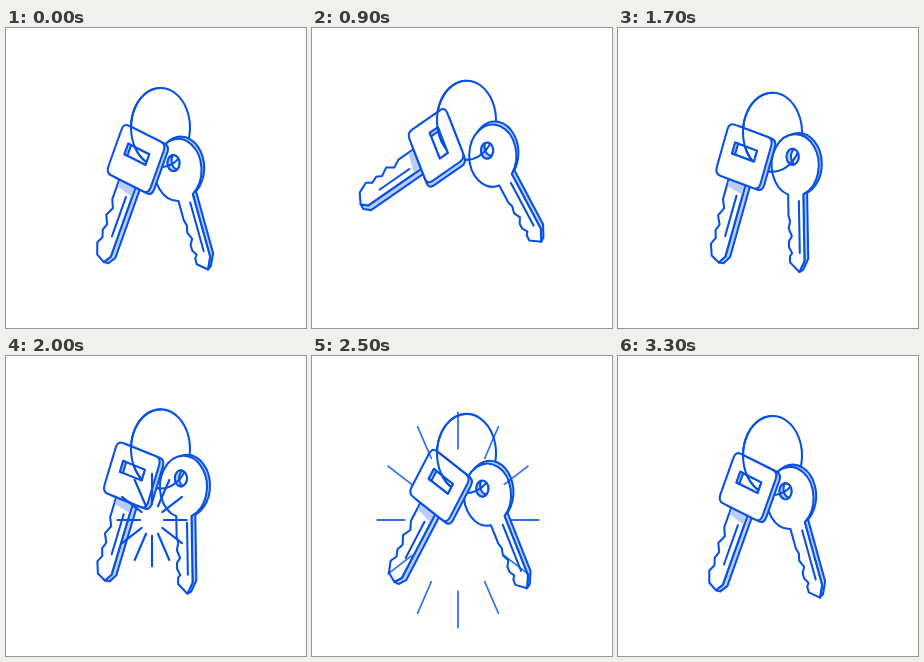
An HTML page for the animation above (3.4 s loop, 300x300 px).

```html
<!DOCTYPE html>
<html lang="en">
<head>
<meta charset="utf-8">
<title>Jingling keys</title>
<style>
  html, body { margin: 0; width: 100%; height: 100%; overflow: hidden; background: #fff; }
  svg { display: block; width: 100vw; height: 100vh; }
  path { vector-effect: non-scaling-stroke; }
  .ink { fill: none; stroke: #0650e6; stroke-width: 2.05; stroke-linecap: round; stroke-linejoin: round; }
  .front { fill: #fff; fill-rule: evenodd; }
  .side { fill: #b9ccfa; fill-rule: evenodd; }
  .shade { fill: #b9ccfa; stroke: none; }
</style>
</head>
<body>
<svg viewBox="0 0 300 300" class="ink">
  <path id="ring"/>

  <g id="roundKey">
    <path class="side" d="M-26 -1 a30.5 31 0 1 1 61 0 a30.5 31 0 1 1 -61 0 Z
      M-11 -8.5 a8 8 0 1 0 16 0 a8 8 0 1 0 -16 0 Z"/>
    <path class="side" d="M10 29 V96 L3 107 L8 105 L15 94 V27 Z"/>
    <path class="front" d="M-10 29.3 A31 31 0 1 1 10 29.3 V96 L3 107 L-9 97 V91 L-6 88 L-10 82 V76 L-6 71 L-10 63 L-8 56 L-10 50 Z
      M-11 -8.5 a8 8 0 1 0 16 0 a8 8 0 1 0 -16 0 Z"/>
    <path class="side" d="M-1 -16.2 A8 8 0 1 0 -1 -0.8 A9 9 0 0 1 -1 -16.2 Z"/>
    <path d="M4 36 V88"/>
  </g>

  <path id="lowerArc"/>

  <g id="squareKey">
    <path class="side" d="M9 20 V101 L3 109 L9 108 L15 100 V20 Z"/>
    <path class="front" d="M-13.5 20 V48 L-9 56 L-14 65 L-9 73 L-12 80 L-9 87 L-13 94 L-8 105 L3 109 L9 101 V20 Z"/>
    <path class="shade" d="M-12.5 25 H8 V37 L-12.5 34 Z"/>
    <path d="M1.8 40 V82"/>
    <path class="side" d="M-20 -26 H25 q7 0 7 7 V20 q0 7 -7 7 H-20 Z M-18 -9.5 V2 H11.5 V-9.5 Z"/>
    <path class="front" d="M-25 -26 H20 q7 0 7 7 V20 q0 7 -7 7 H-25 q-7 0 -7 -7 V-19 q0 -7 7 -7 Z
      M-18 -9.5 V2 H11.5 V-9.5 Z"/>
    <path class="side" d="M-18 -9.5 h4 V2 h-4 Z"/>
  </g>

  <path id="upperArc"/>
  <path id="burst"/>
</svg>
<script>
const LOOP = 3400, STEP = 100;
const RING = { x: 154.5, rx: 29.5, ry: 39.5 };
const BURST = { x: 146, y: 164, squash: 0.75, radius: 116, start: 1800, duration: 1050 };

const el = id => document.getElementById(id);
const rad = deg => deg * Math.PI / 180;

// Sine easing from one turning point [time, value] to the next
function sway(t, ...turns) {
  const i = turns.findIndex(([time]) => time > t);
  if (i === 0) return turns[0][1];
  if (i < 0) return turns[turns.length - 1][1];
  const [[t0, v0], [t1, v1]] = [turns[i - 1], turns[i]];
  return v0 + (v1 - v0) * (1 - Math.cos(Math.PI * (t - t0) / (t1 - t0))) / 2;
}

// Keys swing in planes turned away from the viewer; returns where the hole lands
function placeKey(id, x, y, angle, squash, skew, holeX, holeY) {
  el(id).setAttribute('transform', `translate(${x} ${y}) matrix(${squash} ${skew} 0 1 0 0) rotate(${angle})`);
  const c = Math.cos(rad(angle)), s = Math.sin(rad(angle));
  const px = holeX * c - holeY * s, py = holeX * s + holeY * c;
  return [x + squash * px, y + skew * px + py];
}

function drawArc(id, top, from, to) {
  const point = a => `${RING.x + RING.rx * Math.cos(a)} ${top + RING.ry * (1 + Math.sin(a))}`;
  const large = to - from > Math.PI ? 1 : 0;
  el(id).setAttribute('d', `M${point(from)} A${RING.rx} ${RING.ry} 0 ${large} 1 ${point(to)}`);
}

function drawBurst(t) {
  const u = (t - BURST.start) / BURST.duration, burst = el('burst');
  let d = '';
  if (u > 0 && u < 1.1) {
    const v = Math.min(u, 1);
    const inner = BURST.radius * v ** 1.2, outer = BURST.radius * (1 - (1 - v) ** 2.4);
    for (let a = 0; a < 360; a += 30) {
      const point = r => `${BURST.x + r * BURST.squash * Math.cos(rad(a))} ${BURST.y + r * Math.sin(rad(a))}`;
      d += `M${point(inner)}L${point(outer)}`;
    }
    burst.style.opacity = 1 - 0.6 * v ** 3;
    burst.style.strokeWidth = 2.3 - 0.8 * v;
  }
  burst.setAttribute('d', d);
}

function render(t) {
  const top = sway(t, [300, 60], [1050, 52], [1550, 67], [2170, 50.5], [2650, 60]);
  const spread = sway(t, [400, 0], [1150, 9], [1600, 4], [1950, 4], [2250, 6.5], [2700, 0]);
  const squareSag = sway(t, [500, 71], [1400, 61], [1950, 66], [2200, 65], [2750, 78], [3350, 71]);
  const roundSag = sway(t, [500, 82], [1400, 65], [1950, 78], [2220, 71], [2750, 89], [3350, 82]);
  const squareAngle = sway(t, [450, 25], [1150, 80], [1700, 20], [1950, 20], [2300, 45], [2750, 20], [3300, 25]);
  const roundAngle = sway(t, [600, 20], [1250, 54], [1750, 0], [1950, 0], [2350, 32], [2800, 14], [3300, 20]);

  const squareHole = placeKey('squareKey', 132 - spread, top + squareSag, squareAngle, 0.79, -0.07, -3.3, -3.9);
  const roundHole = placeKey('roundKey', 172 + 1.3 * spread, top + roundSag, -roundAngle, 0.76, 0, -3, -8.5);
  const ringAngle = ([x, y]) => Math.atan2((y - top - RING.ry) / RING.ry, (x - RING.x) / RING.rx);
  const right = ringAngle(roundHole);
  const left = (ringAngle(squareHole) + 2 * Math.PI) % (2 * Math.PI);
  drawArc('ring', top, 0, 2 * Math.PI - 0.001);
  drawArc('lowerArc', top, right, left);
  drawArc('upperArc', top, left, 1.5 * Math.PI);
  drawBurst(t);
}

const start = performance.now();
function tick() {
  const t = (performance.now() - start) % LOOP;
  render(Math.floor(t / STEP) * STEP);
  requestAnimationFrame(tick);
}
tick();
</script>
</body>
</html>
```
